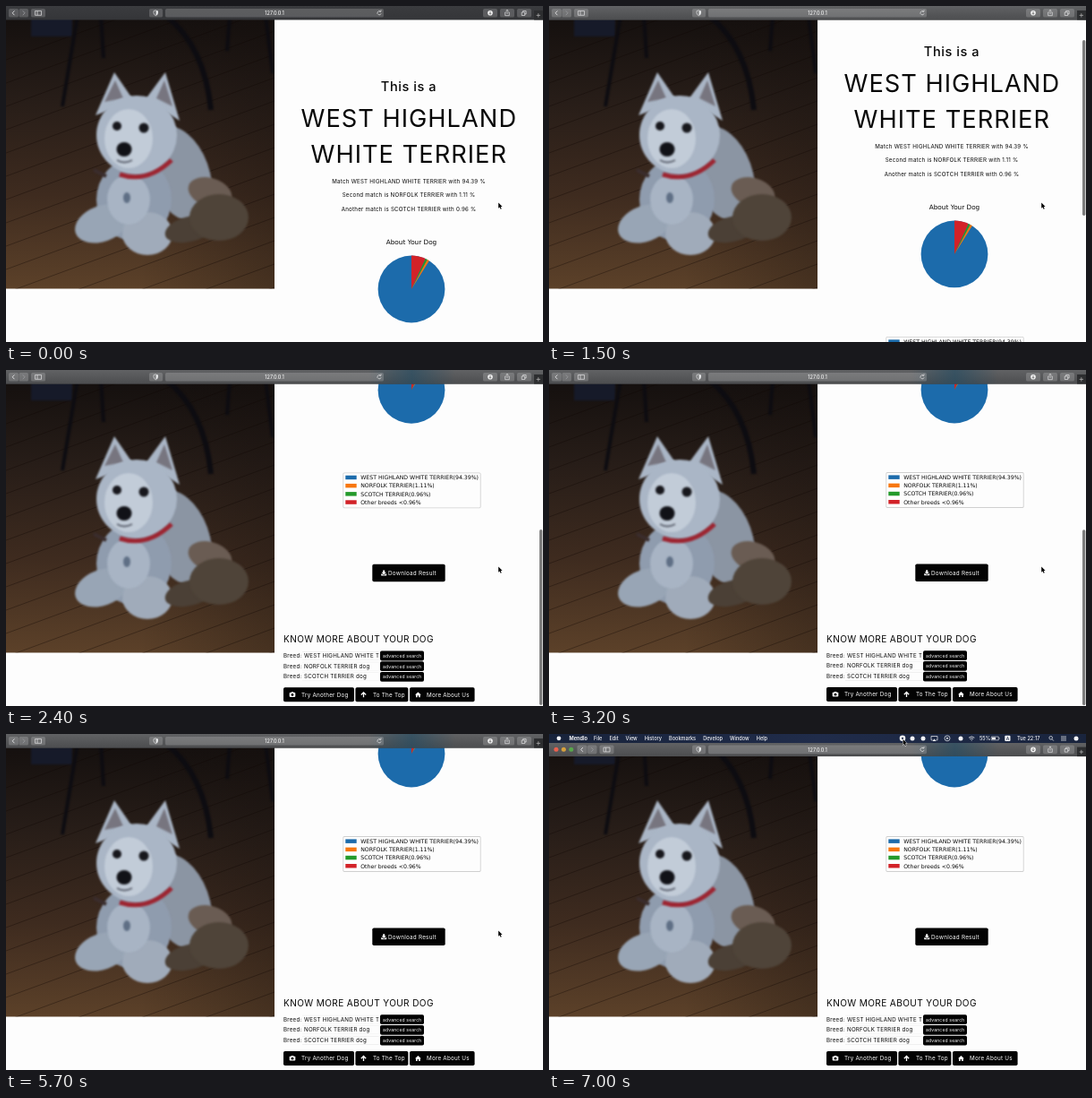
Animation, 600 px wide and 375 px high, one loop 7.1 s. Source, as an HTML page with a canvas:

```html
<!DOCTYPE html>
<html lang="en">
<head>
<meta charset="utf-8">
<title>Dog breed result</title>
<style>
html, body { margin: 0; width: 100%; height: 100%; overflow: hidden; background: #fdfdfd; }
canvas { display: block; width: 600px; height: 375px; }
</style>
</head>
<body>
<canvas id="stage"></canvas>
<script>
const W = 600, H = 375, LOOP = 7100, STEP = 100, SCROLL_END = 294;
const BLUE = '#1c6bab', ORANGE = '#f7760f', GREEN = '#249a2b', RED = '#d22228';
const SANS = 'Inter, "Open Sans", sans-serif', PLOT = '"DejaVu Sans", sans-serif';
const ratio = window.devicePixelRatio || 1;

function makeCanvas(canvas) {
  canvas.width = W * ratio;
  canvas.height = H * ratio;
  const context = canvas.getContext('2d');
  context.scale(ratio, ratio);
  return context;
}
let g = makeCanvas(document.getElementById('stage'));

// Drawing helpers
function rect(x, y, w, h, color, radius = 0) {
  g.fillStyle = color;
  g.beginPath();
  g.roundRect(x, y, w, h, radius);
  g.fill();
}
function disc(x, y, rx, color, ry = rx, turn = 0) {
  g.fillStyle = color;
  g.beginPath();
  g.ellipse(x, y, rx, ry, turn, 0, Math.PI * 2);
  g.fill();
}
function line(d, color, width = 0.7) {
  g.strokeStyle = color;
  g.lineWidth = width;
  g.stroke(new Path2D(d));
}
function shape(d, color) {
  g.fillStyle = color;
  g.fill(new Path2D(d));
}
function fade(x0, y0, x1, y1, ...colors) {
  const gradient = g.createLinearGradient(x0, y0, x1, y1);
  colors.forEach((color, i) => gradient.addColorStop(i / (colors.length - 1), color));
  return gradient;
}
function text(str, x, y, size, { color = '#080808', align = 'left', weight = 400, font = SANS, spacing = 0.037 } = {}) {
  g.font = `${weight} ${size}px ${font}`;
  g.letterSpacing = `${size * spacing}px`;
  g.textAlign = align;
  g.fillStyle = color;
  g.fillText(str, x, y);
  return g.measureText(str).width;
}

const clamp = v => Math.min(1, Math.max(0, v));
function ease(t, from, to) {
  const u = clamp((t - from) / (to - from));
  return u * u * (3 - 2 * u);
}
function scrollAt(t) {
  const u = Math.max(0, t - 1300) / 471;
  return SCROLL_END * (1 - Math.exp(-(u ** 2.275)));
}

function paintPhoto() {
  const coat = '#aab6c6', wood = '#0d0c11';
  g.beginPath();
  g.rect(0, 0, 300, 315.5);
  g.clip();
  rect(0, 0, 300, 316, fade(0, 0, 0, 316, '#120e0d', '#271d18', '#3e2b1f', '#5c4129'));
  rect(0, 0, 300, 316, fade(150, 0, 300, 0, 'rgba(20,14,12,0)', 'rgba(20,14,12,.3)'));
  for (let y = 60; y < 480; y += 26) line(`M0 ${y}l300 -110`, 'rgba(15,8,5,.35)', 1);

  g.filter = 'blur(1px)';
  rect(28, 0, 46, 34, '#161a29');
  line('M80 10L63 112M106 10L109 58M250 10L247 50M290 10L298 75', wood, 4);
  line('M178 10Q222 45 229 116', wood, 6);

  // Dog, back to front
  disc(194, 187, 33, '#8b95a3', 55, -0.35);
  disc(143, 216, 42, '#8f9cae', 46);
  disc(107, 243, 31, '#98a5b5', 20, -0.35);
  disc(158, 254, 28, '#a0abba', 24);
  shape('M100 122L121 74L143 106ZM156 104L178 74L194 128Z', coat);
  shape('M110 107L122 83L131 103ZM168 103L177 83L186 112Z', '#77757f');
  disc(146, 144, 45, coat, 44);
  disc(137, 148, 27, '#c2ccd8', 33);
  disc(137, 216, 24, '#a8b4c4', 28);
  line('M127 188Q158 198 185 172', '#9d2430', 5);
  line('M98 183l14 7', '#3a2d2d', 4);
  disc(135, 214, 4, '#5f6f85', 6);
  disc(124, 134, 5, '#17171c');
  disc(154, 136, 5.5, '#17171c');
  disc(132, 160, 8.5, '#111217', 8);
  line('M124 172q8 5 17 0', '#5c626f', 2);

  // Slipper
  disc(228, 208, 25, '#6a5c53', 16, 0.3);
  disc(205, 249, 28, '#4b4036', 14, -0.25);
  disc(238, 236, 33, '#4f4439', 26);
}

function paintPie(x, y, r) {
  const wedge = (from, to, color) => {
    g.fillStyle = color;
    g.beginPath();
    g.moveTo(x, y);
    g.arc(x, y, r, (from - 90) * Math.PI / 180, (to - 90) * Math.PI / 180);
    g.fill();
  };
  disc(x, y, r, BLUE);
  wedge(0, 25, RED);
  wedge(25, 28.4, GREEN);
  wedge(28.4, 32, ORANGE);
}

function button(x, y, w, h, label, size, inset) {
  rect(x, y, w, h, '#030303', 1.8);
  text(label, x + inset, y + h / 2 + size * 0.37, size, { color: '#fff' });
}

function paintPage(scroll) {
  const center = { align: 'center' };
  g.save();
  g.translate(0, -scroll);
  text('This is a', 450, 95, 14.6, { align: 'center', weight: 500 });
  text('WEST HIGHLAND', 450.3, 135, 27.25, center);
  text('WHITE TERRIER', 450.3, 175, 27.25, center);
  ['Match WEST HIGHLAND WHITE TERRIER with 94.39 %', 'Second match is NORFOLK TERRIER with 1.11 %',
   'Another match is SCOTCH TERRIER with 0.96 %']
    .forEach((match, i) => text(match, 450, 198 + i * 15.4, 6.2, center));

  text('About Your Dog', 453, 266, 7.3, { align: 'center', font: PLOT, spacing: 0 });
  paintPie(453, 316, 37.4);
  rect(376.4, 408.1, 154.2, 39.8, '#cfcfcf', 1.6);
  rect(377.2, 408.9, 152.6, 38.2, '#fdfdfd', 1);
  [['WEST HIGHLAND WHITE TERRIER(94.39%)', BLUE], ['NORFOLK TERRIER(1.11%)', ORANGE],
   ['SCOTCH TERRIER(0.96%)', GREEN], ['Other breeds <0.96%', RED]].forEach(([label, color], i) => {
    const y = 413.7 + i * 9.2;
    rect(379.3, y - 2.3, 12.4, 4.5, color);
    text(label, 396.2, y + 2.2, 6.2, { font: PLOT, spacing: 0 });
  });

  button(409.3, 510.5, 81.4, 19.5, 'Download Result', 6.35, 17.7);
  shape('M421.2 517.2h2v2.3h1.6l-2.6 2.6l-2.6-2.6h1.6zM419.2 521.2h1l2 1.5l2-1.5h1v2h-6z', '#fff');

  text('KNOW MORE ABOUT YOUR DOG', 310, 598, 10.1);
  ['WEST HIGHLAND WHITE TERRIER dog', 'NORFOLK TERRIER dog', 'SCOTCH TERRIER dog'].forEach((breed, i) => {
    const y = 612.5 + i * 11.7;
    text('Breed:', 310, y + 2.1, 6.2);
    g.save();
    g.beginPath();
    g.rect(331, y - 5, 85.5, 10);
    g.clip();
    for (const edge of [-4.8, 4.5]) rect(331, y + edge, 86, 0.5, '#e4e4e4');
    text(breed, 333, y + 2.1, 6.2);
    g.restore();
    button(418, y - 5.2, 49, 10.8, 'advanced search', 5, 3);
  });

  button(310, 648, 79, 16, 'Try Another Dog', 6.3, 20);
  button(390.4, 648, 59, 16, 'To The Top', 6.3, 19.6);
  button(451, 648, 72.6, 16, 'More About Us', 6.3, 19);
  rect(316.7, 653.8, 6.6, 4.8, '#fff', 0.8);
  rect(318.6, 652.9, 2.8, 2, '#fff', 0.5);
  disc(320, 656.2, 1.4, '#030303');
  line('M399.5 659v-5.3M396.8 656.2l2.7-2.7l2.7 2.7', '#fff', 1.3);
  shape('M457 656.3l3.4-3.2l3.4 3.2h-1v2.7h-1.7v-2h-1.4v2h-1.7v-2.7z', '#fff');
  g.restore();
}

function paintToolbar(reveal, scroll) {
  const ink = '#e2e3e4', box = 'rgba(255,255,255,.18)';
  const icon = (x, w) => rect(x, 3, w, 9.6, box, 1.7);
  const tint = clamp((scroll - 270) / 24);
  g.save();
  g.translate(0, 9.6 * reveal);
  rect(0, 0, W, 15.5, fade(0, 0, 0, 15.5, '#3b3c3f', '#343538'));
  // Page content under the bar makes it lighter
  g.globalAlpha = clamp(scroll / 30);
  rect(0, 0, W, 15.5, fade(0, 0, 0, 15.5, '#616264', '#4c4d4f'));
  g.globalAlpha = tint;
  rect(405, 0, 97, 15.5, fade(405, 0, 502, 0, 'rgba(35,75,98,0)', 'rgba(35,75,98,.65)', 'rgba(35,75,98,0)'));
  g.globalAlpha = reveal;
  ['#e9604f', '#d6a13d', '#58a64c'].forEach((color, i) => disc(8 + i * 8.4, 7.6, 2.5, color));
  g.globalAlpha = 1;

  g.save();
  g.translate(28.5 * reveal, 0);
  icon(3, 11);
  icon(14.5, 10.5);
  icon(28, 16);
  line('M9.4 5.4l-2.2 2.4l2.2 2.4', ink, 0.9);
  line('M18.8 5.4l2.2 2.4l-2.2 2.4', '#96979a', 0.9);
  line('M32.5 5.5h7v4.8h-7zM35 5.5v4.8', ink);
  g.restore();

  icon(160, 15);
  shape('M167.5 4.7l2.5.9v2.3q-.2 1.9-2.5 3z', ink);
  line('M167.5 4.7l-2.5.9v2.3q.2 1.9 2.5 3', ink);
  icon(178, 244);
  text('127.0.0.1', 300, 9.9, 5.5, { color: '#f2f2f2', align: 'center', weight: 500, spacing: 0 });
  line('M418.6 6.3a2.1 2.1 0 1 0 .5 2M417 6.2h2v-1.8', ink);

  for (let i = 0; i < 3; i++) icon(533 + i * 19, 16);
  disc(541, 7.8, 2.8, '#f3f3f3');
  line('M541 6v3.1M539.8 8l1.2 1.3l1.2-1.3', '#555');
  line('M558.7 7h-1v3.7h4.6V7h-1M560 9V4.3M558.8 5.5l1.2-1.2l1.2 1.2', ink);
  line('M576.2 7h3.5v3.5h-3.5zM577.6 7V5.5h3.5V9h-1.4', ink);
  rect(590, 5, 10, 10.5, '#2d2e30');
  line('M594.8 8.2v4.4M592.6 10.4h4.4', '#bbb');
  g.restore();
}

function paintMenuBar(reveal) {
  const ink = '#f4f5f8', navy = '#202c4a';
  const label = (str, x, weight = 500) => text(str, x, 7, 5.6, { color: ink, weight, spacing: 0 });
  g.save();
  g.translate(0, -10 * (1 - reveal));
  rect(0, 0, W, 10, fade(0, 0, W, 0, '#18233b', navy, '#19243d'));

  disc(11, 4.8, 2.4, ink);
  let x = 22.5;
  x += label('Mendlo', x, 700) + 7;
  for (const item of ['File', 'Edit', 'View', 'History', 'Bookmarks', 'Develop', 'Window', 'Help']) {
    x += label(item, x) + 8;
  }

  disc(395, 4.8, 3.3, ink);
  disc(395, 4.8, 1.1, navy);
  for (const logo of [406, 418, 460, 589]) disc(logo, 4.9, 2.5, ink);
  line('M428.5 6.8h-1.5V2.5h7v4.3h-1.5', ink);
  shape('M430.5 5.4l2.2 2.6h-4.4zM444.2 3.4l2.3 1.4l-2.3 1.4z', ink);
  line('M448 4.8a3 3 0 1 0-6 0a3 3 0 1 0 6 0', ink);
  line('M469 4.2q3.2-2.8 6.4 0M470.3 5.6q1.9-1.6 3.8 0M471.6 7h1.2', ink, 0.8);
  label('55%', 481);
  line('M494.3 3h8v3.8h-8zM503.2 4.2v1.4', ink, 0.6);
  rect(495, 3.7, 4, 2.4, ink);
  rect(509.3, 1.8, 6.2, 6.2, ink, 1);
  text('A', 512.4, 6.8, 5, { color: navy, align: 'center', weight: 500, spacing: 0 });
  label('Tue 22:17', 523);
  line('M562.5 4.3a1.8 1.8 0 1 0-3.6 0a1.8 1.8 0 1 0 3.6 0M562 5.7l1.8 1.9', ink);
  line('M572 3h6M572 5h6M572 7h6', ink);
  g.restore();
}

function paintCursor(x, y) {
  const arrow = 'M0 0V6.2L1.4 5L2.4 7.3L3.5 6.8L2.5 4.6H4.4Z';
  g.save();
  g.translate(x, y);
  line(arrow, '#fff', 1);
  shape(arrow, '#000');
  g.restore();
}

const stage = g, photo = document.createElement('canvas');
g = makeCanvas(photo);
paintPhoto();
g = stage;

function draw(now) {
  const t = Math.floor((now % LOOP) / STEP) * STEP;
  const scroll = scrollAt(t);
  const thumb = ease(t, 1300, 1500) - ease(t, 3300, 3700);
  const pointer = ease(t, 5800, 6300), reveal = ease(t, 6200, 6500);
  rect(0, 0, W, H, '#fdfdfd');
  paintPage(scroll);
  g.drawImage(photo, 0, 0, W, H);
  rect(596, 16.5 + scroll * 0.55, 3.4, 196, `rgba(110,110,110,${0.9 * thumb})`, 1.7);
  paintToolbar(reveal, scroll);
  paintMenuBar(reveal);
  paintCursor(550.2 - 154.7 * pointer, 219.5 - 213.5 * pointer);
}

const start = performance.now();
function tick() {
  draw(performance.now() - start);
  requestAnimationFrame(tick);
}
tick();
</script>
</body>
</html>
```
